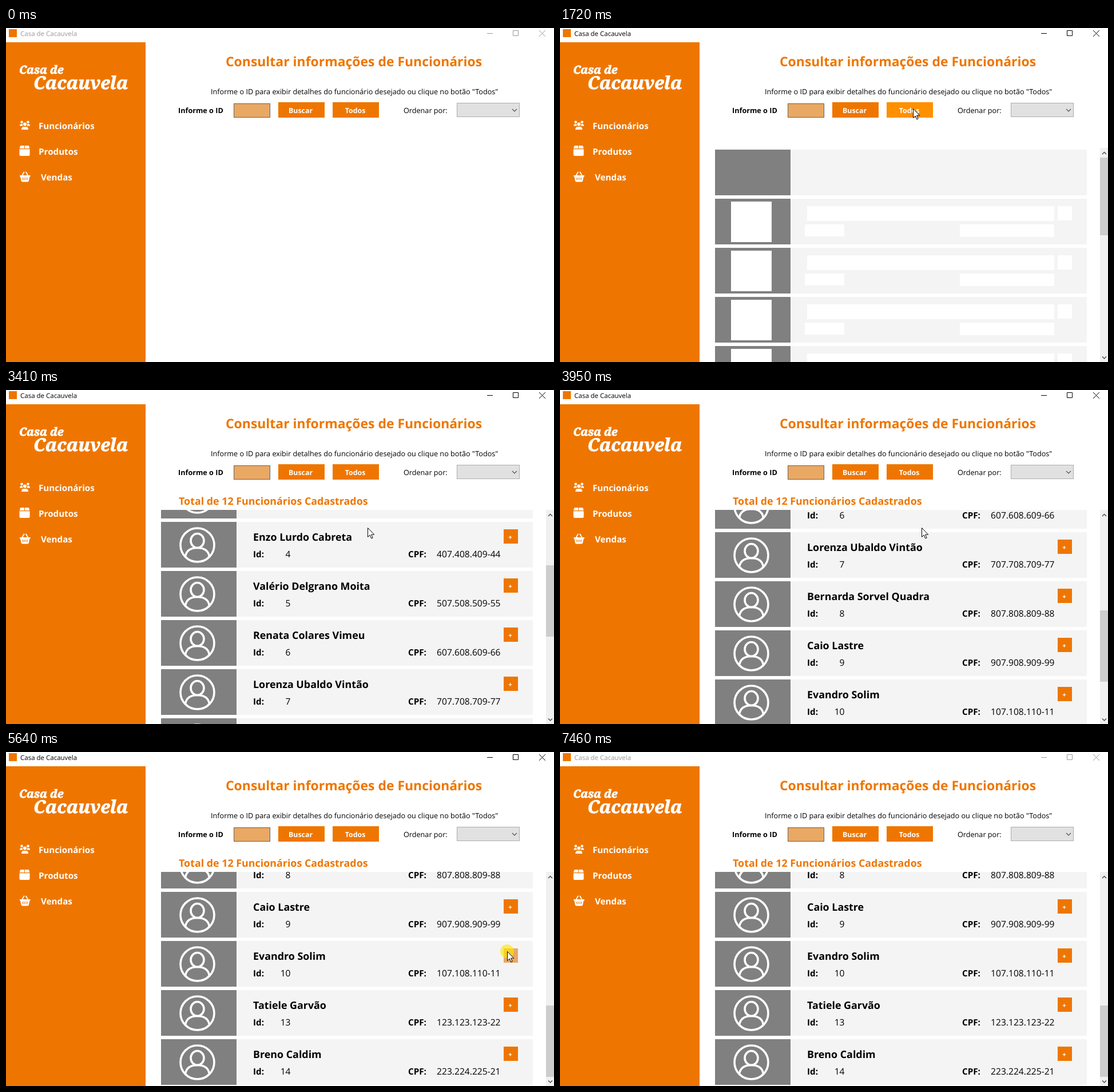
Animation, 958 px wide and 585 px high, one loop 7.53 s. Source, as an HTML page:

```html
<!DOCTYPE html>
<html lang="pt">
<head>
<meta charset="utf-8">
<title>Consulta</title>
<style>
  html, body { margin: 0; width: 100%; height: 100%; overflow: hidden; background: #fff; }
  svg { display: block; width: 100%; height: 100%; }
  text { font-family: "Open Sans", "Noto Sans", sans-serif; font-size: 12.65px; text-rendering: geometricPrecision; white-space: pre; }
  .b { font-weight: 700; }
  .nav { font-size: 15.2px; fill: #fff; }
  .btn { font-size: 12.4px; fill: #fff; text-anchor: middle; }
  .name { font-size: 17.87px; }
  .label { font-size: 15.2px; }
  .num { font-size: 15.6px; }
  .job { font-size: 14.8px; }
  .end { text-anchor: end; }
  .sign { font-size: 11.5px; fill: #fff; text-anchor: middle; }
  .brand { font-family: "Noto Serif", "Liberation Serif", serif; font-weight: 900; font-style: italic; fill: #fff; stroke: #fff; stroke-width: .9; }
</style>
</head>
<body>
<svg id="stage" viewBox="0 0 958 585" preserveAspectRatio="none">
  <defs>
    <clipPath id="view"><rect x="271" y="210" width="687" height="375"/></clipPath>
    <g id="avatar" fill="none" stroke="#fff" stroke-width="3.600">
      <circle cx="334.500" cy="40.500" r="29.500"/>
      <ellipse cx="334.500" cy="33" rx="11.500" ry="12.500"/>
      <path d="M313.500 61C315 50 323 45.500 334.500 45.500S354 50 355.500 61"/>
    </g>
  </defs>
  <rect width="958" height="585" fill="#fff"/>

  <rect x="5" y="2" width="14" height="14" fill="#ee7600"/>
  <g id="bar">
    <text x="25" y="14" style="font-size:11.5px">Casa de Cacauvela</text>
    <path d="M841 9.500h10M886.500 4.500h9v9h-9zM932 4l11 11M943 4l-11 11" fill="none" stroke="currentColor"/>
  </g>

  <rect y="25" width="244" height="560" fill="#ee7600"/>
  <text class="brand" x="23" y="80" style="font-size:19.5px">Casa de</text>
  <text class="brand" x="48" y="107" style="font-size:31px">Cacauvela</text>
  <g fill="#fff">
    <circle cx="27.500" cy="164.800" r="2.300"/><circle cx="38.500" cy="164.800" r="2.300"/>
    <circle cx="33" cy="168.500" r="3"/>
    <path d="M24 171.500q0-3.500 3-3.500h1.800q-.3 2 1 3.500zM42 171.500q0-3.500-3-3.500h-1.800q.3 2-1 3.500zM27 178q0-5 4-5h4q4 0 4 5z"/>
    <path d="M26 206h6v5h-8.300l1-4q.3-1 1.300-1zM33 206h6q1 0 1.300 1l1 4H33zM23.500 212.300h18v9.700q0 2-2 2h-14q-2 0-2-2z"/>
    <path d="M24 258h18.500v2.600H41.300l-1.400 7q-.4 1.900-2 1.900h-9.400q-1.600 0-2-1.900l-1.400-7H24z"/>
  </g>
  <path d="M27.800 259l3.700-6.500M38.700 259L35 252.500" stroke="#fff" stroke-width="1.800" stroke-linecap="round"/>
  <path d="M29.700 262v4.500M33.200 262v4.500M36.700 262v4.500" stroke="#ee7600" stroke-width="1.300"/>
  <text class="b nav" x="57" y="177">Funcionários</text>
  <text class="b nav" x="57" y="222">Produtos</text>
  <text class="b nav" x="61" y="267">Vendas</text>

  <text class="b" x="384" y="67" fill="#ee7600" style="font-size:22.95px">Consultar informações de Funcionários</text>
  <text x="358" y="116">Informe o ID para exibir detalhes do funcionário desejado ou clique no botão "Todos"</text>
  <text class="b" x="301" y="149">Informe o ID</text>
  <rect x="398.500" y="132.500" width="63" height="24" fill="#e9a864" stroke="#646464"/>
  <rect x="476" y="130" width="81" height="27" fill="#ee7600"/>
  <text class="b btn" x="515" y="149">Buscar</text>
  <rect id="todos" x="571" y="130" width="81" height="27"/>
  <text class="b btn" x="610.500" y="149">Todos</text>
  <text x="695" y="149">Ordenar por:</text>
  <rect x="788.500" y="131.500" width="109" height="24" fill="#e1e1e1" stroke="#adadad"/>
  <path d="M885 142l4 4 4-4" fill="none" stroke="#505050" stroke-width="1.200"/>
  <text id="total" class="b name" x="302" y="201" fill="#ee7600">Total de 12 Funcionários Cadastrados</text>

  <g clip-path="url(#view)">
    <g id="rows"></g>
    <g id="scroll">
      <rect x="944" y="210" width="14" height="375" fill="#f0f0f0"/>
      <rect id="thumb" x="944" width="14" fill="#cdcdcd"/>
      <path d="M948 221l3.500-3.500 3.500 3.500M948 575.500l3.500 3.500 3.500-3.500" fill="none" stroke="#505050" stroke-width="1.500"/>
    </g>
  </g>

  <g id="mouse">
    <circle id="click" r="12"/>
    <path id="arrow" d="M.5 .5v16l3.700-3.500 2.600 6 2.400-1-2.600-5.800h5.100z" fill="#fff" stroke="#000"/>
    <path id="beam" d="M-1-6.500h6M2-6.500v14M-1 7.500h6" fill="none" stroke="#000"/>
  </g>
</svg>
<script>
const LOOP = 7530, TOP = 213, PITCH = 86, DETAIL = 100, OPENED = 9;
const $ = id => document.getElementById(id);
const show = (el, on) => el.setAttribute('display', on ? 'inline' : 'none');
const set = (el, attrs) => { for (const k in attrs) el.setAttribute(k, attrs[k]); };

const people = [
  ['Otávio Bragantes Lourel', '107.108.109-11'],
  ['Davino Torrelo Quintas', '207.208.209-22'],
  ['Marlene Fontanela Gusmões', '307.308.309-33'],
  ['Enzo Lurdo Cabreta', '407.408.409-44'],
  ['Valério Delgrano Moita', '507.508.509-55'],
  ['Renata Colares Vimeu', '607.608.609-66'],
  ['Lorenza Ubaldo Vintão', '707.708.709-77'],
  ['Bernarda Sorvel Quadra', '807.808.809-88'],
  ['Caio Lastre', '907.908.909-99'],
  ['Evandro Solim', '107.108.110-11'],
  ['Tatiele Garvão', '123.123.123-22', 13],
  ['Breno Caldim', '223.224.225-21', 14]
];

const rect = (x, y, w, h, fill) => `<rect x="${x}" y="${y}" width="${w}" height="${h}" fill="${fill}"/>`;
const text = (cls, x, y, s) => `<text class="${cls}" x="${x}" y="${y}">${s}</text>`;
const label = (x, y, s) => text('b label', x, y, s);

const blanks = [[299, 5, 71, 71], [432, 13, 432, 26], [870, 13, 25, 25], [428, 45, 69, 21], [699, 45, 165, 22]]
  .map(b => rect(...b, '#fff')).join('');

const details = label(299, 120, 'Cargo:') + text('job', 373, 119, 'Vendedor') +
  label(462, 120, 'Contato:') + text('num', 562.5, 119, '11900000007') +
  label(704, 120, 'Salário:') + text('num end', 865, 119, 'R$ 2000,00') +
  label(299, 152, 'Data do Cadastro:') + text('num', 469, 152, '2/02/2017') +
  label(638, 152, 'Quantidade de Vendas:') + text('num end', 865, 152, '0');

$('rows').innerHTML = people.map(([name, cpf, id], i) => `<g class="row">
  <rect class="back" x="271" width="650" height="80" fill="#f4f4f4"/>${rect(271, 0, 132, 80, '#808080')}
  <g class="blank">${i ? blanks : ''}</g>
  <g class="full"><use href="#avatar"/>${text('b name', 432, 33, name)}
    ${label(432, 62, 'Id:')}${text('num end', 497.5, 62, id || i + 1)}
    ${label(703, 62, 'CPF:')}${text('num end', 864.5, 62, cpf)}
    <rect class="plus" x="870" y="13" width="25" height="25"/>${text('b sign', 881.5, 31, '+')}</g>
  <g class="more">${i === OPENED ? details : ''}${rect(271, 179, 650, 1, '#808080')}</g></g>`).join('');

const rows = [...document.querySelectorAll('.row')].map(g => {
  const part = c => g.querySelector('.' + c);
  return { g, back: part('back'), blank: part('blank'), full: part('full'), plus: part('plus'), sign: part('sign'), more: part('more') };
});

// Pointer moves: start, end, number of steps, from, to
const moves = [
  [330, 1020, 11, [650, 528], [617, 141]],
  [2400, 2740, 6, [617, 141], [632, 241]],
  [4890, 5570, 11, [632, 241], [876, 349]],
  [6260, 6260, 1, [876, 349], [877, 352]],
  [7330, 7400, 2, [877, 352], [877, 378]]
];
const ease = p => p * p * (3 - 2 * p);

function pointer(t) {
  let at = moves[0][3];
  for (const [start, end, n, a, b] of moves) {
    if (t < start) break;
    const k = t >= end ? n : 1 + Math.floor((t - start) / (end - start) * (n - 1));
    const p = ease(k / n);
    at = a.map((v, i) => v + (b[i] - v) * p);
  }
  return at.map(Math.round);
}

// Wheel notches of 120 px, the last one stopped by the end of the list
const notches = [2940, 3340, 3740, 3880, 4350, 4560];
const scrollAt = t => Math.min(656, 120 * notches.filter(n => t >= n).length);

const clicks = [[1160, 1300, '#ffe600'], [5640, 5780, '#ffe600'], [6590, 6720, '#ffbe00']];
const inside = (x, y, l, tp, w, h) => x >= l && x < l + w && y >= tp && y < tp + h;

function draw(t) {
  const [x, y] = pointer(t);
  const active = t >= 330 && t < 7400;
  const count = t < 1300 ? 0 : Math.min(12, 5 + Math.floor((t - 1300) / 70));
  const open = t >= 5710 && t < 6720;
  const scroll = scrollAt(t);
  const mouseOn = t >= 330 && t < 7460;
  let beam = false;

  set($('bar'), { fill: active ? '#000' : '#999', color: active ? '#000' : '#999' });
  set($('todos'), { fill: mouseOn && inside(x, y, 571, 130, 81, 27) ? '#ff9000' : '#ee7600' });
  show($('total'), t >= 2070);

  rows.forEach((r, i) => {
    const top = TOP + i * PITCH + (open && i > OPENED ? DETAIL : 0) - scroll;
    const grown = open && i === OPENED;
    const ready = t >= (i < 2 ? 1930 : 2000);
    const hover = mouseOn && inside(x, y, 870, top + 13, 25, 25);
    show(r.g, i < count);
    set(r.g, { transform: `translate(0 ${top})` });
    set(r.back, { height: grown ? 180 : 80 });
    show(r.blank, !ready);
    show(r.full, ready);
    show(r.more, grown && t >= 5850);
    set(r.plus, { fill: grown ? '#e53c42' : hover ? '#e9a864' : '#ee7600' });
    r.sign.textContent = grown ? 'x' : '+';
    if (ready && inside(x, y, 432, top + 13, 432, 26)) beam = true;
    if (ready && inside(x, y, 699, top + 45, 165, 22)) beam = true;
  });

  const height = Math.max(count, 1) * PITCH + (open ? DETAIL : 0);
  show($('scroll'), count > 0);
  set($('thumb'), { y: Math.round(227 + scroll * 342 / height), height: Math.ceil(375 * 342 / height) });

  const click = clicks.find(c => t >= c[0] && t < c[1]);
  show($('mouse'), mouseOn);
  set($('mouse'), { transform: `translate(${x} ${y})` });
  show($('click'), !!click);
  if (click) set($('click'), { fill: click[2], 'fill-opacity': 0.62 });
  show($('arrow'), !beam);
  show($('beam'), beam);
}

function tick() {
  draw(performance.now() % LOOP);
  requestAnimationFrame(tick);
}
tick();
</script>
</body>
</html>
```
